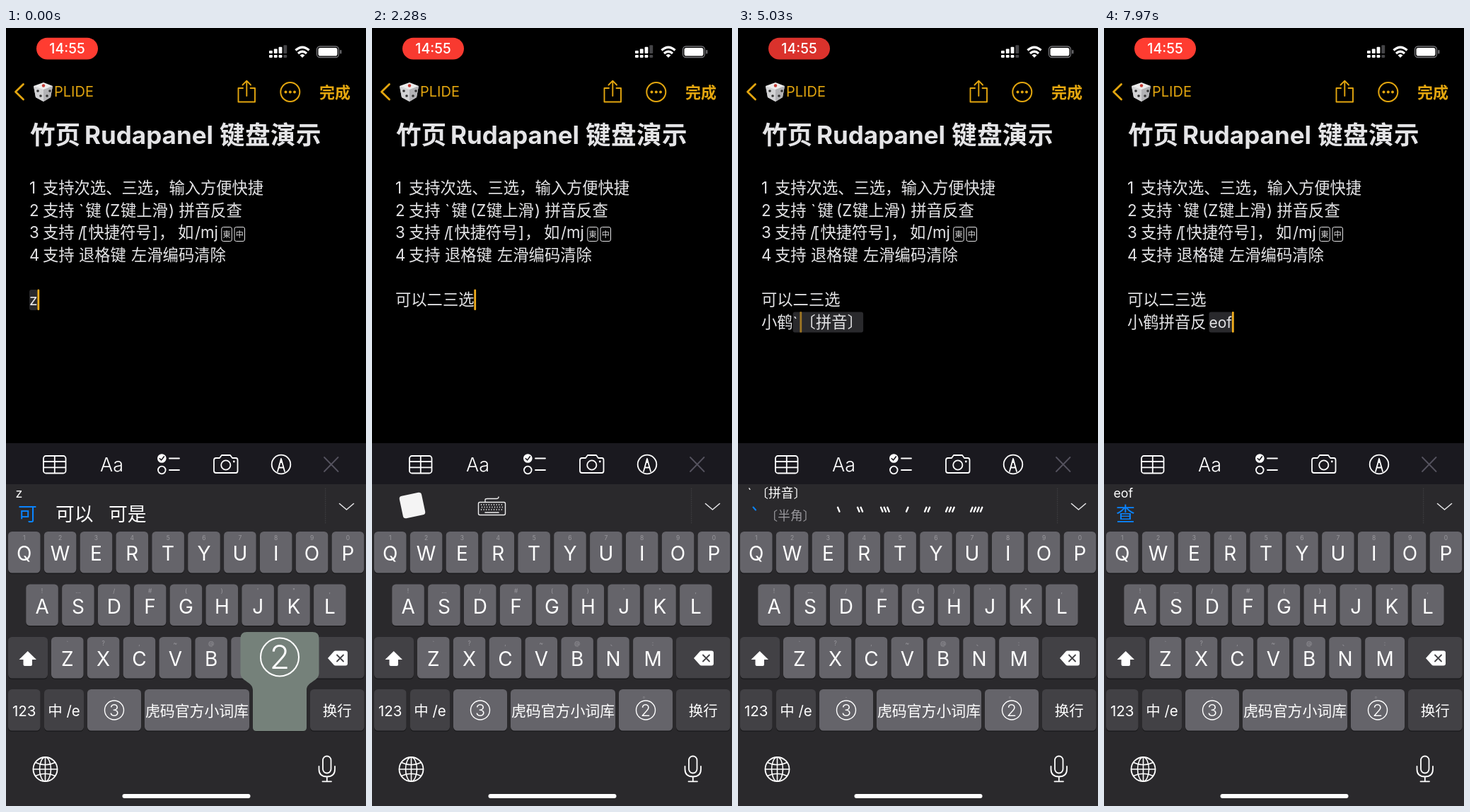
An HTML page that plays this animation: 509x1100 px, repeating every 8 s.

```html
<!DOCTYPE html>
<html lang="zh-CN">
<head>
<meta charset="utf-8">
<title>键盘演示</title>
<style>
html, body { margin: 0; width: 100%; height: 100%; overflow: hidden; background: #000; }
svg { display: block; width: 100%; height: 100%; }
text { font-family: Inter, "Noto Sans CJK SC", "Noto Sans CJK", "Noto Sans", sans-serif; }
</style>
</head>
<body>
<svg id="stage" viewBox="0 0 509 1100" xmlns="http://www.w3.org/2000/svg"></svg>
<script>
const LOOP = 8000, PRESS = 130;
const GOLD = '#e3a60f', INK = '#e4e4e6', BLUE = '#0a84ff';
const KEY = '#65646a', DARK_KEY = '#424145', PANEL = '#2a292c', POPUP = '#75817a';

// time, pressed key, committed text, composition, candidates
const steps = [
  [0, '②', '', 'z', '可 可以 可是'],
  [110, '', '可以', '', ''],
  [430, 'M', '可以', 'm', '不 不是 不过'],
  [660, 'E', '可以', 'me', '二 研究 同样 ? ? ?'],
  [930, ' ', '可以二', '', ''],
  [1130, 'J', '可以二', 'j', '上 上面 上去'],
  [1330, 'K', '可以二', 'jk', '三 三个'],
  [1510, ' ', '可以二三', '', ''],
  [1720, 'T', '可以二三', 't', '先 先后 先是'],
  [1880, 'G', '可以二三', 'tg', '选 选择'],
  [2060, ' ', '可以二三选', '', ''],
  [2560, '换行', '可以二三选\n', '', ''],
  [2780, 'X', '可以二三选\n', 'x', '小 小心 小说'],
  [3060, ' ', '可以二三选\n小', '', ''],
  [3380, 'W', '可以二三选\n小', 'w', '得 怎么 怎样'],
  [3610, 'Y', '可以二三选\n小', 'wy', '鸟 确实'],
  [3830, 'Q', '可以二三选\n小', 'wyq', '鹤'],
  [4060, ' ', '可以二三选\n小鹤', '', ''],
  [4550, 'Z', '可以二三选\n小鹤', '`〔拼音〕', '`'],
  [5180, 'P', '可以二三选\n小鹤', 'p〔拼音〕', '怕 平 跑'],
  [5350, 'I', '可以二三选\n小鹤', 'pi〔拼音〕', '批 皮 脾'],
  [5530, 'N', '可以二三选\n小鹤', 'pin〔拼音〕', '品 拼 频'],
  [5720, 'Y', '可以二三选\n小鹤', 'piny〔拼音〕', '拼音 品 拼'],
  [5900, 'I', '可以二三选\n小鹤', 'pinyi〔拼音〕', '拼音 品 拼'],
  [6080, 'N', '可以二三选\n小鹤', 'pinyin〔拼音〕', '拼音 品 拼'],
  [6400, ' ', '可以二三选\n小鹤拼音', '', ''],
  [7000, 'R', '可以二三选\n小鹤拼音', 'r', '反 反正 反应'],
  [7220, ' ', '可以二三选\n小鹤拼音反', '', ''],
  [7430, 'E', '可以二三选\n小鹤拼音反', 'e', '相 相信 相当'],
  [7610, 'O', '可以二三选\n小鹤拼音反', 'eo', '杏 想来'],
  [7790, 'F', '可以二三选\n小鹤拼音反', 'eof', '查']
];

const rect = (x, y, w, h, r, fill, more = '') =>
  `<rect x="${x}" y="${y}" width="${w}" height="${h}" rx="${r}" fill="${fill}" ${more}/>`;
const text = (x, y, size, str, fill = INK, more = '') =>
  `<text x="${x}" y="${y}" font-size="${size}" fill="${fill}" ${more}>${str}</text>`;
const mid = (x, y, size, str, fill = '#fff', more = '') =>
  text(x, y, size, str, fill, `text-anchor="middle" ${more}`);
const line = (d, color = '#fff', w = 2, more = '') =>
  `<path d="${d}" fill="none" stroke="${color}" stroke-width="${w}" stroke-linecap="round" stroke-linejoin="round" ${more}/>`;
const ring = (x, y, r, color = '#fff', w = 2) =>
  `<circle cx="${x}" cy="${y}" r="${r}" fill="none" stroke="${color}" stroke-width="${w}"/>`;
const dot = (x, y, r, fill) => `<circle cx="${x}" cy="${y}" r="${r}" fill="${fill}"/>`;
const numeral = (x, y, r, n) =>
  ring(x, y, r, '#fff', r / 20 + 0.7) + mid(x, y + r * 0.62, r * 1.72, n, '#fff', 'font-weight="300"');

function statusBar() {
  let s = rect(43, 13.8, 87, 30.8, 15.4, '#ff3b30', 'id="pill"') +
    mid(86.5, 36.3, 19.5, '14:55', '#fff', 'font-weight="500"');
  for (let i = 0; i < 4; i++) {
    const x = 372 + i * 6.8, h = 4 + i * 2.6, c = i < 3 ? '#fff' : '#454548';
    s += rect(x, 36 - h, 4.8, h, 1, c) + rect(x, 38, 4.8, 4, 1.2, c);
  }
  s += line('M409.5 31.5Q419 23 428.5 31.5', '#fff', 3.4, 'style="stroke-linecap:butt"') +
    line('M413 36Q419 30.5 425 36', '#fff', 3.2, 'style="stroke-linecap:butt"') +
    '<path d="M415.5 38.5Q419 35.5 422.5 38.5L419 42Z" fill="#fff"/>';
  return s + rect(439.5, 26, 31, 15.5, 4.5, 'none', 'stroke="#77777b" stroke-width="1.3"') +
    rect(441.5, 28, 27, 11.5, 2.8, '#fff') + rect(472.3, 31, 2, 5.5, 1, '#77777b');
}

function navBar() {
  const pips = [[53, 81.5], [45, 89], [49, 96], [58, 96], [62, 89]];
  return line('M24.5 79.5L13.5 90.3L24.5 101', GOLD, 2.8) +
    '<path d="M53 77L66 82L63 98L53 104L42 98L39 82Z" fill="#ececec"/>' +
    '<path d="M39 82L53 87V104L42 98Z" fill="#d2d2d4"/><path d="M66 82L53 87V104L63 98Z" fill="#b2b2b5"/>' +
    pips.map(([x, y], i) => dot(x, y, i ? 1.8 : 2.2, i ? '#333' : '#c43a34')).join('') +
    text(68, 97.3, 20, 'PLIDE', GOLD) +
    line('M335 85H328.5V104.5H352V85H345.5M340.3 96V75M334.5 80.5L340.3 74.7L346 80.5', GOLD, 1.9) +
    ring(401.8, 90.5, 13.5, GOLD, 2) + [395.5, 401.8, 408].map(x => dot(x, 90.5, 2, GOLD)).join('') +
    text(443, 98.5, 22, '完成', GOLD, 'font-weight="700"');
}

function note() {
  const rows = [
    [[33, '1'], [52, '支持次选、三选，输入方便快捷']],
    [[33, '2'], [52, '支持'], [103, '`'], [112.5, '键'], [139, '(Z'], [162, '键上滑'], [230, ')'], [244.5, '拼音反查']],
    [[33, '3'], [52, '支持'], [102, '/'], [107, '['], [116.5, '快捷符号'], [207, ']'], [216, '，'], [243, '如'], [267, '/mj']],
    [[33, '4'], [52, '支持'], [103, '退格键'], [177, '左滑编码清除']]
  ];
  let s = text(34, 164, 35.6, '竹页', INK, 'font-weight="700"') +
    text(111, 164, 35, 'Rudapanel', INK, 'font-weight="700"') +
    text(302, 164, 35.6, '键盘演示', INK, 'font-weight="700" letter-spacing="0.4"');
  rows.forEach((row, i) => row.forEach(([x, str]) => s += text(x, 234 + i * 31.6, 22.3, str)));
  [[304.8, '東'], [323, '中']].forEach(([x, c]) => s +=
    rect(x, 281.5, 14.5, 20, 2.5, 'none', `stroke="${INK}" stroke-width="1"`) + mid(x + 7.2, 295.8, 11, c, INK));
  return s;
}

function toolbar() {
  return rect(0, 587, 509, 58, 0, '#1a191f') +
    rect(53, 605, 31.5, 24.5, 3.5, 'none', 'stroke="#fff" stroke-width="1.8"') +
    line('M53 613H84M53 621.3H84M68.8 605V629', '#fff', 1.8) +
    text(133, 626.8, 27, 'Aa', '#fff', 'font-weight="300"') +
    dot(220.3, 608.5, 6.3, '#fff') + line('M217.3 608.7L219.6 611L223.4 606', '#1a191f', 1.6) +
    ring(220.3, 625, 5.3, '#fff', 1.8) + line('M231 608.5H245M231 625H245', '#fff', 1.8) +
    line('M297 608H302L305 604H317L320 608H325Q327.5 608 327.5 611V626Q327.5 629 325 629H297Q294 629 294 626V611Q294 608 297 608Z', '#fff', 1.8) +
    ring(310.8, 618, 6.6, '#fff', 1.8) + dot(322.3, 613, 1.4, '#fff') +
    ring(389, 617, 13.3, '#fff', 1.8) + line('M384 627L389 609L394 627M385.5 621.5H392.5', '#fff', 1.8) +
    '<path d="M387 615L389 608L391 615Z" fill="#fff"/>' +
    line('M450 607L469.5 627M469.5 607L450 627', '#55535f', 1.8);
}

function idleBar() {
  let s = rect(41, 659, 32, 32, 4, '#f4f4f4', 'transform="rotate(-12 57 675)"') +
    rect(150.5, 670.5, 38, 18, 2, 'none', 'stroke="#eee" stroke-width="1.4"') +
    line('M160 670V667Q160 665.5 163 665.5H176Q179 665.5 179 663', '#eee', 1.3) +
    line('M160 685H179', '#eee', 1.6);
  for (let r = 0; r < 3; r++)
    s += line(`M${154 + r % 2} ${674 + r * 3.5}H186`, '#eee', 1.8, 'stroke-dasharray="1 2.6" style="stroke-linecap:butt"');
  return s;
}

const keys = {};
function addKey(id, x, y, w, label, hint = '', fill = KEY) {
  keys[id] = { x, y, w, label, fill, hint };
}
function addRow(letters, x, y, hints) {
  [...letters].forEach((c, i) => {
    const k = x + i * 50.85;
    addKey(c, k, y, c === 'M' ? 56 : 45.5, c, hints[i]);
  });
}
addRow('QWERTYUIOP', 3, 712, '1234567890');
addRow('ASDFGHJKL', 28.3, 786.5, '!…/#()\'",');
addRow('ZXCVBNM', 64, 861, '`?,~@、:');
addKey('shift', 3, 861, 56, '', '', DARK_KEY);
addKey('del', 430, 861, 76.5, '', '', DARK_KEY);
addKey('123', 3, 935, 45.5, '123', '', DARK_KEY);
addKey('lang', 54, 935, 56, '中 /e', '', DARK_KEY);
addKey('③', 115, 935, 76, '③', '.');
addKey(' ', 196, 935, 148, '虎码官方小词库');
addKey('②', 349, 935, 76, '②', '。');
addKey('换行', 430, 935, 76.5, '换行', '', DARK_KEY);

function label(k) {
  const cx = k.x + k.w / 2, str = k.label;
  if (str === '③' || str === '②') return numeral(cx, k.y + 29.5, 13.5, str === '③' ? 3 : 2);
  return str.length === 1 ? mid(cx, k.y + 41, 28, str)
    : mid(cx, k.y + 37.5, str.length > 4 ? 20.9 : 20.5, str);
}
function drawKey(k, fill = k.fill) {
  return rect(k.x, k.y + 1.3, k.w, 58.5, 5.5, '#19191b') + rect(k.x, k.y, k.w, 58.5, 5.5, fill) +
    mid(k.x + k.w / 2, k.y + 12, 8.5, k.hint, '#9a999e') + label(k);
}

function keyboard() {
  const globe = 'M38.5 1048H72.5M55.5 1031V1065M41.5 1038.5Q55.5 1045 69.5 1038.5M41.5 1057.5Q55.5 1051 69.5 1057.5';
  return Object.values(keys).map(k => drawKey(k)).join('') +
    '<path d="M30.7 881L43 893H37V900Q37 902 35 902H26.5Q24.5 902 24.5 900V893H18.5Z" fill="#fff"/>' +
    '<path d="M455 891L463.5 881.5Q464.5 880.5 466 880.5H480Q483 880.5 483 883.5V898.5Q483 901.5 480 901.5H466Q464.5 901.5 463.5 900.5Z" fill="#fff"/>' +
    line('M468 886.5L477 895.5M477 886.5L468 895.5', DARK_KEY, 1.8) +
    ring(55.5, 1048, 17, '#fff', 1.8) + line(globe, '#fff', 1.6) +
    '<ellipse cx="55.5" cy="1048" rx="8" ry="17" fill="none" stroke="#fff" stroke-width="1.6"/>' +
    rect(448, 1029.5, 11.5, 24, 5.7, 'none', 'stroke="#fff" stroke-width="1.8"') +
    line('M442.5 1044V1048Q442.5 1058.5 453.8 1058.5Q465 1058.5 465 1048V1044M453.8 1059V1065M447.5 1065.3H460', '#fff', 1.8) +
    rect(164.5, 1083, 181, 6, 3, '#fff');
}

function popup(k) {
  if (k.w > 80 || k.fill === DARK_KEY) return drawKey(k, k.fill === DARK_KEY ? KEY : DARK_KEY);
  const first = k.y === 712, top = k.y - (first ? 63 : 81);
  const l = Math.max(1, k.x - 17.5), r = Math.min(508, k.x + k.w + 17.5), kr = k.x + k.w;
  const s = top + 58, d = first ? 42 : 24, e = s + d, b = k.y + 59;
  const path = `M${l + 9} ${top}H${r - 9}Q${r} ${top} ${r} ${top + 9}V${s}C${r} ${s + d / 2} ${kr} ${e - d / 2} ${kr} ${e}` +
    `V${b - 5}Q${kr} ${b} ${kr - 5} ${b}H${k.x + 5}Q${k.x} ${b} ${k.x} ${b - 5}V${e}C${k.x} ${e - d / 2} ${l} ${s + d / 2} ${l} ${s}V${top + 9}Q${l} ${top} ${l + 9} ${top}Z`;
  const cx = (l + r) / 2;
  return `<path d="${path}" fill="${POPUP}"/>` +
    (first ? line(`M${l} 707.5H${r}M${k.x} 766H${kr}`, '#4c5652', 1) : '') +
    (k.label === '②' ? numeral(cx, top + 35.5, 27, 2) : mid(cx, top + 55.5, 53, k.label));
}

function candidates(list) {
  if (list === '`') {
    const marks = [[140, 1, 1], [168, 2, 1], [201, 3, 1], [237, 1, -1], [263, 2, -1], [293, 3, -1], [328, 4, -1]];
    let s = line('M21.5 677.5L25 681.5', BLUE, 2) + text(38.5, 696, 17.7, '〔半角〕', '#98979c');
    for (const [x, n, dir] of marks)
      for (let i = 0; i < n; i++)
        s += line(`M${x + 1 + i * 4.6 + (dir < 0 ? 2.5 : 0)} 677.8l${dir * 2.5} 6`, '#fff', 2.3);
    return s;
  }
  let x = 17, s = '';
  list.split(' ').forEach((word, i) => {
    if (i === 1) x = 70;
    s += word === '?'
      ? rect(x + 3, 677, 23, 24.5, 2, 'none', 'stroke="#fff" stroke-width="2.6"') + mid(x + 14.5, 696, 19, '?', '#fff', 'font-weight="700"')
      : text(x, 697, 26.8, word, i ? '#fff' : BLUE);
    x += word.length > 1 ? 75 : 51;
  });
  return s;
}

const stage = document.getElementById('stage');
stage.innerHTML = rect(0, 0, 509, 1100, 0, '#000') + statusBar() + navBar() + note() +
  '<g id="typed"></g>' + toolbar() + rect(0, 645, 509, 455, 0, PANEL) +
  line('M451.7 651V700', '#414044', 1, 'stroke-dasharray="1 2"') +
  line('M471.5 672.5L481.5 681L491.5 672.5', '#e4e4e6', 1.6) +
  '<g id="bar"></g>' + keyboard() + '<g id="press"></g>' +
  '<text id="ruler" font-size="21" visibility="hidden"></text>';
const [pill, typed, bar, press, ruler] = ['pill', 'typed', 'bar', 'press', 'ruler'].map(id => document.getElementById(id));

function widthOf(str) {
  ruler.textContent = str;
  return str ? ruler.getComputedTextLength() : 0;
}

function drawTyped(body, code) {
  const rows = body.split('\n'), last = rows.length - 1, y = 392 + last * 31.6;
  let s = rows.map((row, i) => text(33, 392 + i * 31.6, 22.3, row)).join('');
  let x = 33 + rows[last].length * 22.3;
  if (code) {
    const [head, tail] = code.split('〔');
    if (rows[last] && head !== '`') x += 4;
    const w = head === '`' ? 10 : widthOf(head);
    s += rect(x, y - 22, w + (tail ? 89.5 : 0), 29, 3, '#29292c') + text(x, y, 21, head);
    if (tail) s += text(x + w, y, 22.3, '〔' + tail);
    x += w;
  }
  typed.innerHTML = s + rect(x - 0.2, y - 22.5, 2.8, 29.5, 1.2, '#f0ad1e', 'id="caret"');
}

// solid, fade out, hidden, fade in
function blink(age) {
  const p = age % 1000;
  if (p < 400) return 1;
  if (p < 600) return (600 - p) / 200;
  return p < 850 ? 0 : (p - 850) / 150;
}

let shown = -1;
const start = performance.now();
function frame() {
  const t = (performance.now() - start) % LOOP;
  let i = steps.length - 1;
  while (steps[i][0] > t) i--;
  const [at, key, body, code, list] = steps[i];
  if (i !== shown) {
    shown = i;
    drawTyped(body, code);
    const spaced = code.replace('〔', '<tspan dx="6">〔</tspan>');
    bar.innerHTML = code ? text(13.5, 663.5, 17.8, spaced, '#fff') + candidates(list) : idleBar();
    press.innerHTML = key ? popup(keys[key]) : '';
  }
  press.setAttribute('visibility', t - at < PRESS ? 'visible' : 'hidden');
  document.getElementById('caret').setAttribute('opacity', blink(t - at));
  const glow = (1 + Math.cos(t / 1000 * Math.PI)) / 2;
  pill.setAttribute('fill', `rgb(${218 + 37 * glow},${50 + 10 * glow},${44 + 5 * glow})`);
  requestAnimationFrame(frame);
}
frame();
</script>
</body>
</html>
```
